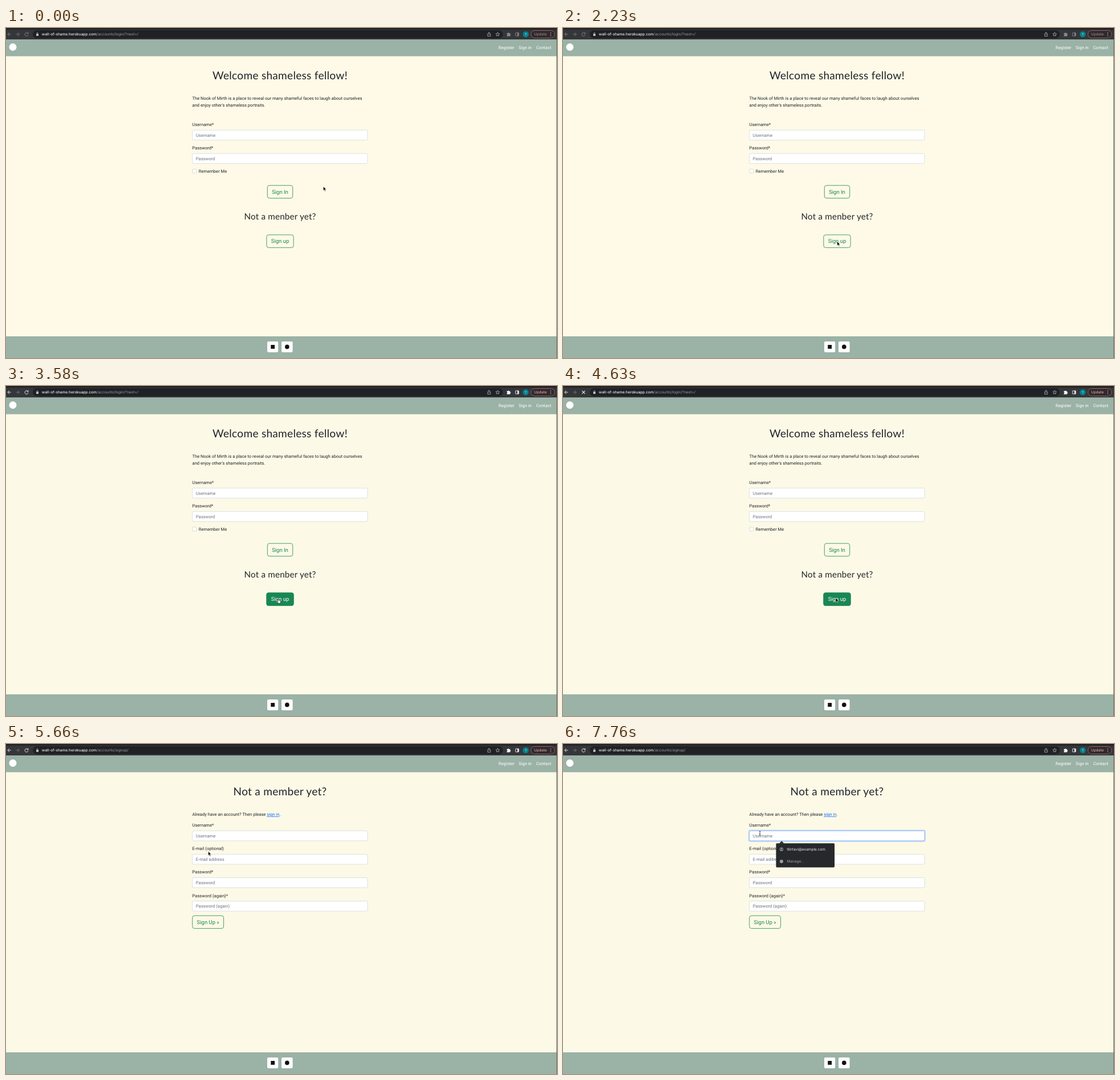
An HTML page for the animation above (8000 ms loop, 966x579 px).

```html
<!DOCTYPE html>
<html lang="en">
<head>
<meta charset="utf-8">
<title>Sign up</title>
<style>
  html, body { margin: 0; width: 100%; height: 100%; overflow: hidden; background: #fefae7; }
  svg { display: block; width: 966px; height: 579px; }
  text { font: 7.6px Roboto, sans-serif; fill: #212529; text-rendering: geometricPrecision; white-space: pre; }
  .h1 { font: 19.1px Lato, sans-serif; letter-spacing: .27px; }
  .h2 { font: 15.2px Lato, sans-serif; letter-spacing: .2px; }
  .mid { text-anchor: middle; }
  .ph { fill: #6c757d; }
  .nav { fill: #fff; }
  .btn { font-size: 9.5px; fill: #198754; text-anchor: middle; }
  .ui { font: 6.5px Inter, sans-serif; }
  .field { fill: #fff; stroke: #ced4da; stroke-width: .7; }
  .line { fill: none; stroke: #198754; stroke-width: .8; }
  .icon { fill: none; stroke: var(--ink); stroke-width: .9; }
  .fill { fill: var(--ink); }
</style>
</head>
<body>
<svg id="stage" viewBox="0 0 966 579" xmlns="http://www.w3.org/2000/svg"></svg>
<script>
const LOOP = 8000;
const CX = 480.5;

const text = (x, y, s, cls = '', extra = '') => `<text x="${x}" y="${y}" class="${cls}" ${extra}>${s}</text>`;
const box = (x, y, w, h, r, attrs) => `<rect x="${x}" y="${y}" width="${w}" height="${h}" rx="${r}" ${attrs}/>`;
const dot = (x, y, r, attrs) => `<circle cx="${x}" cy="${y}" r="${r}" ${attrs}/>`;
const path = (d, attrs = 'class="icon"') => `<path d="${d}" ${attrs}/>`;
const group = (id, body) => `<g id="${id}">${body}</g>`;

// Label with its input; y is the top of the input
const field = (y, label, hint) =>
  text(326.5, y - 6.8, label) +
  box(326.7, y + .3, 307.2, 17.6, 2, 'class="field"') +
  text(332.8, y + 11.7, hint, 'ph');

const button = (x, y, w, label) =>
  box(x, y, w, 22.4, 3.6, 'class="line"') +
  text(x + w / 2, y + 14.4, label, 'btn');

const toolbar =
  box(0, 0, 966, 20, 0, 'fill="#35363a"') +
  box(0, 0, 966, 2.5, 0, 'fill="#202124"') +
  box(47, 4, 824, 14, 7, 'fill="#202124"') +
  path('M8.8 11H3M5.8 8 2.8 11l3 3') +
  path('M17.4 11h5.8M20.4 8l3 3-3 3', 'fill="none" stroke="#7b7d80" stroke-width=".9"') +
  group('reload', path('M38.6 9.6A3 3 0 1 0 39 11.6M39 7.6v2.3h-2.4')) +
  group('stop', path('M33.4 8.4l5.2 5.2M38.6 8.4l-5.2 5.2', 'class="icon" style="stroke-width:1.1"')) +
  box(53, 10.2, 4, 3.6, .4, 'fill="#c4c7ca"') +
  path('M53.9 10.4V9.2a1.1 1.1 0 0 1 2.2 0v1.2', 'fill="none" stroke="#c4c7ca" stroke-width=".7"') +
  `<text x="62.8" y="13.3" class="ui" style="fill:#f1f3f4"><tspan font-weight="500">wall-of-shame.herokuapp.com</tspan><tspan id="route" fill="#9aa0a6"></tspan></text>` +
  path('M845.6 10h-1.2v4.4h5V10h-1.2M846.9 12.4V7.6M845.3 9l1.6-1.6L848.5 9', 'fill="none" stroke="#c4c7ca" stroke-width=".7"') +
  path('M862 7.6l1 2.3 2.4.2-1.9 1.6.6 2.4-2.1-1.3-2.1 1.3.6-2.4-1.9-1.6 2.4-.2z', 'fill="none" stroke="#c4c7ca" stroke-width=".7"') +
  path('M878 9h1.8a1.1 1.1 0 0 1 2.2 0h1.8v1.8a1.1 1.1 0 0 1 0 2.2v1.6H878v-1.9a1 1 0 0 0 0-2z', 'class="fill"') +
  box(893.3, 8.3, 5.6, 5.6, .5, 'class="icon"') +
  box(896.6, 8.3, 2.3, 5.6, 0, 'class="fill"') +
  dot(911.2, 11, 5.2, 'fill="#00838f"') +
  text(911.2, 13, 'T', 'ui mid', 'style="font-size:5.4px;fill:#e6f2f3"') +
  box(920.3, 4.5, 41.6, 13, 6.5, 'fill="#2f2a2d" stroke="#b0676a" stroke-width=".8"') +
  text(925.8, 13.4, 'Update', 'ui', 'id="update"') +
  [8.2, 11, 13.8].map(y => dot(955, y, .75, 'fill="#e0b0ac"')).join('');

const header =
  box(0, 20, 966, 29.5, 0, 'fill="#9bb2a6"') +
  dot(12, 33.5, 6.5, 'fill="#fff"') +
  group('nav', text(863.6, 37.4, 'Register', 'nav') + text(898.8, 37.4, 'Sign in', 'nav') + text(929.4, 37.4, 'Contact', 'nav'));

const login =
  text(CX, 90, 'Welcome shameless fellow!', 'h1 mid') +
  text(326.5, 126.2, 'The Nook of Mirth is a place to reveal our many shameful faces to laugh about ourselves') +
  text(326.5, 137.6, 'and enjoy other\'s shameless portraits.') +
  field(178.8, 'Username*', 'Username') +
  field(219.9, 'Password*', 'Password') +
  box(327, 247.6, 7, 7, 1.6, 'fill="#fff" stroke="#bfbfbf" stroke-width=".6"') +
  text(337.8, 254, 'Remember Me') +
  button(458.3, 276.2, 44.4, 'Sign In') +
  text(CX, 335.6, 'Not a menber yet?', 'h2 mid') +
  box(456.5, 362.5, 48, 23, 3.6, 'id="hover" fill="#198754"') +
  group('signup', button(456.9, 362.9, 47.2, 'Sign up'));

const join =
  text(CX, 90, 'Not a member yet?', 'h1 mid') +
  text(326.5, 126.2, 'Already have an account? Then please <tspan fill="#0d6efd" text-decoration="underline">sign in</tspan>.') +
  field(152, 'Username*', 'Username') +
  field(193.1, 'E-mail (optional)', 'E-mail address') +
  field(234.2, 'Password*', 'Password') +
  field(275.3, 'Password (again)*', 'Password (again)') +
  button(326.8, 301.2, 54.8, 'Sign Up »') +
  group('focus',
    box(325.8, 151.4, 309, 19.4, 3, 'fill="none" stroke="#c2d8f7" stroke-width="2"') +
    box(326.7, 152.3, 307.2, 17.6, 2, 'fill="none" stroke="#86b7fe" stroke-width=".8"')) +
  box(332.2, 156.2, .7, 9.6, 0, 'id="caret" fill="#212529"') +
  group('popup',
    path('M379 174.5l4.3-4.3 4.3 4.3z', 'fill="#27282b"') +
    box(373.5, 174.2, 102.6, 42.2, 1.6, 'fill="#27282b"') +
    dot(383, 184.7, 2.9, 'fill="none" stroke="#c4c7ca" stroke-width=".7"') +
    dot(383, 183.8, 1, 'fill="#c4c7ca"') +
    path('M381 186.6q2-1.6 4 0', 'fill="none" stroke="#c4c7ca" stroke-width=".8"') +
    text(392.4, 187, 'tilirtavi@example.com', 'ui', 'style="fill:#e8eaed"') +
    dot(383, 206, 3, 'fill="#9aa0a6"') +
    text(392.4, 208.4, 'Manage...', 'ui', 'style="fill:#9aa0a6"'));

const footer =
  box(0, 541, 966, 38, 0, 'fill="#9bb2a6"') +
  group('links',
    box(458, 550, 19.2, 19, 2, 'fill="#fdfdfd"') + box(483, 550, 19.6, 19, 2, 'fill="#fdfdfd"') +
    box(464.3, 556, 6.8, 6.8, 0, 'fill="#111"') + dot(492.8, 559.4, 3.8, 'fill="#111"')) +
  group('bare',
    box(465, 552, 12.8, 6.6, 2.4, 'fill="#e8e8e8"') + box(483, 552, 12.8, 6.6, 2.4, 'fill="#e8e8e8"') +
    text(CX, 576.6, '© Nook of Mirth', 'nav mid'));

const pointers =
  group('arrow', path('M0 0V7.4L1.7 5.8 2.9 8.5 4.1 8 2.9 5.4H5.2Z', 'fill="#000" stroke="#fff" stroke-width=".5"')) +
  group('hand', path('M0 .5q.6-.8 1.2 0V3l2.6.6q.9.3.9 1.3l-.5 2.4V8.4H.4L-1.9 5.5q-.2-1 .9-.7l1 .8Z', 'fill="#fff" stroke="#000" stroke-width=".6"')) +
  group('beam', path('M-1.3-3.6Q0-3.6 0-2.8Q0-3.6 1.3-3.6M0-2.8V2.8M-1.3 3.6Q0 3.6 0 2.8Q0 3.6 1.3 3.6M-.8.9H.8', 'fill="none" stroke="#111" stroke-width=".7"'));

const stage = document.getElementById('stage');
stage.innerHTML =
  box(0, 0, 966, 579, 0, 'id="page"') + toolbar + header +
  group('login', login) + group('join', join) + footer +
  box(965, 20, 1, 559, 0, 'fill="#66736c"') + group('pointer', pointers);

const el = {};
stage.querySelectorAll('[id]').forEach(n => el[n.id] = n);
const show = (id, on) => el[id].style.display = on ? '' : 'none';

// time, x, y, shape
const moves = [
  [0, 556.3, 278, 'arrow'],
  [150, 541, 290], [300, 506, 317], [450, 484, 335], [600, 478.5, 341.2],
  [890, 478, 346], [1040, 476, 356], [1190, 474, 367], [1330, 472.6, 373], [1480, 472.4, 375],
  [1930, 475, 375], [2080, 479, 374.6], [2230, 480.7, 374.5],
  [2680, 479, 373], [2830, 478, 372.4], [2980, 477, 372.8, 'hand'],
  [4630, 478, 371.8, 'arrow'],
  [5370, 473, 360], [5520, 420, 270], [5660, 354.6, 188.4], [5810, 346.5, 163],
  [5960, 345.2, 156.6, 'beam']
];

const between = (t, a, b) => t >= a && t < b;

function draw(t) {
  let x, y, shape;
  for (const m of moves) {
    if (m[0] > t) break;
    [, x, y] = m;
    shape = m[3] || shape;
  }
  el.pointer.setAttribute('transform', `translate(${x} ${y})`);
  for (const s of ['arrow', 'hand', 'beam']) show(s, s === shape);

  const active = t >= 2830;
  stage.style.setProperty('--ink', active ? '#f1f3f4' : '#85878a');
  el.update.style.fill = active ? '#f0b4ae' : '#a08f8f';
  el.page.setAttribute('fill', active ? '#fdf9e7' : '#fefae7');

  const joined = t >= 4770;
  const bare = between(t, 4770, 4920);
  const loading = between(t, 4180, 4920);
  show('login', !joined);
  show('join', joined);
  el.route.textContent = joined ? '/accounts/signup/' : '/accounts/login/?next=/';
  show('stop', loading);
  show('reload', !loading);
  show('bare', bare);
  show('links', !bare);
  el.nav.style.opacity = bare ? .75 : 1;

  const glow = t < 2980 ? 0 : t < 3130 ? .6 : 1;
  el.hover.style.opacity = glow;
  el.signup.querySelector('text').style.fill = glow ? '#fff' : '';

  show('focus', t >= 6260);
  show('popup', t >= 6410);
  show('caret', between(t, 6260, 6860) || between(t, 7310, 7760));
}

function tick() {
  draw(performance.now() % LOOP);
  requestAnimationFrame(tick);
}
tick();
</script>
</body>
</html>
```
